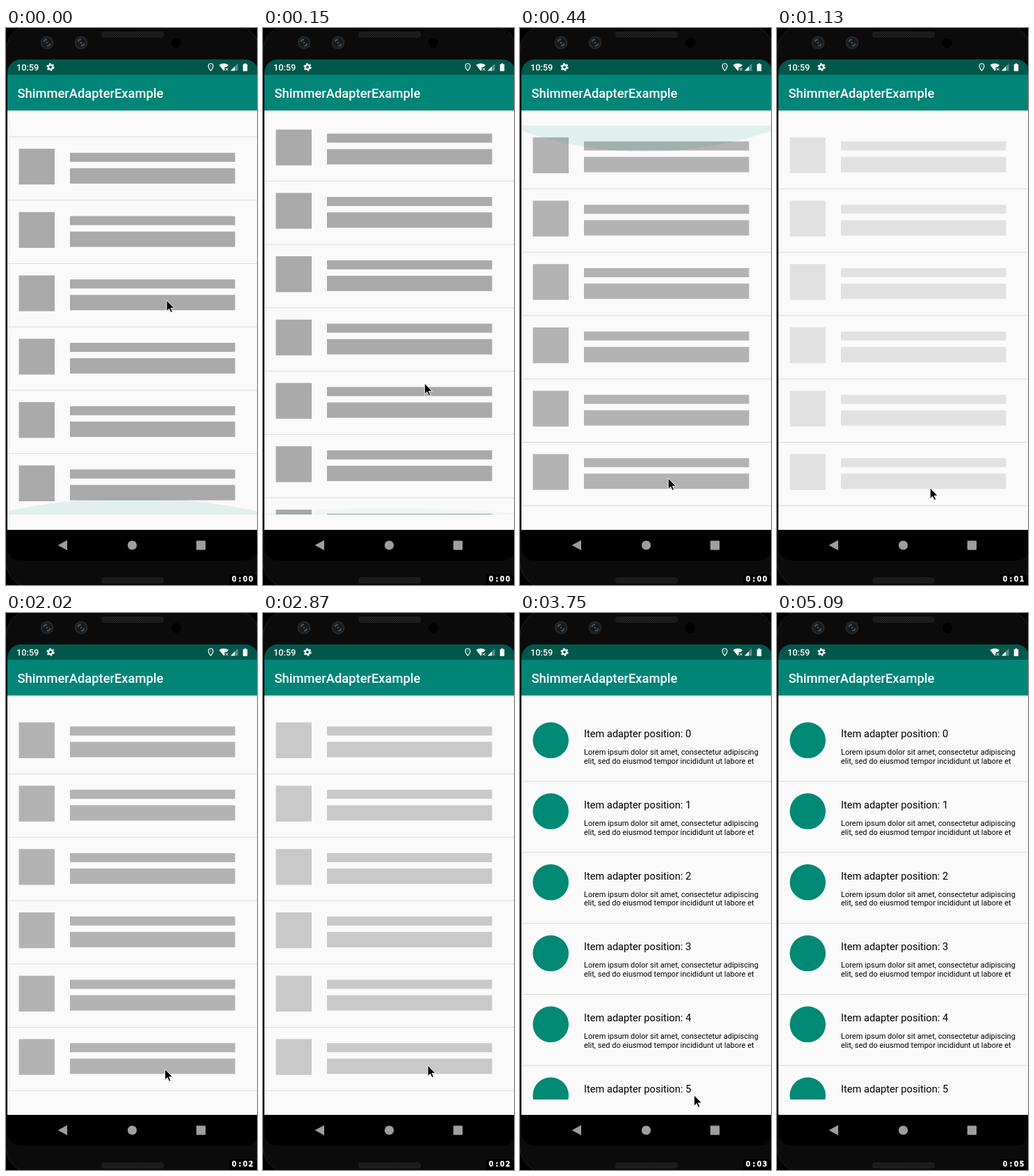
Recreate the animation shown at these times as an HTML page. Size 361 by 798 pixels, loop 5.19 s.

```html
<!DOCTYPE html>
<html lang="en">
<head>
<meta charset="utf-8">
<title>Shimmer list</title>
<style>
html, body { margin: 0; width: 361px; height: 798px; overflow: hidden; background: #000; }
svg { display: block; font-family: Roboto, sans-serif; }
.medium { font-weight: 500; fill: #fff; }
.title { font-size: 14.62px; }
.detail { font-size: 11.03px; }
.timer { font: bold 9.6px "DejaVu Sans", sans-serif; fill: #fff; stroke: #fff; stroke-width: .3; }
.line { fill: #dadada; }
</style>
</head>
<body>
<svg width="361" height="798" viewBox="0 0 361 798">
  <defs>
    <clipPath id="screen"><rect x="2" y="45" width="361" height="718" rx="19"/></clipPath>
    <clipPath id="list"><rect x="2" y="140" width="359" height="557"/></clipPath>
    <linearGradient id="shade" x2="0" y2="1">
      <stop stop-color="#000" stop-opacity=".2"/><stop offset="1" stop-color="#000" stop-opacity="0"/>
    </linearGradient>
    <pattern id="mesh" width="3" height="3" patternUnits="userSpaceOnUse">
      <rect width="3" height="3" fill="#262626"/><path d="M0 0L3 3M3 0L0 3" stroke="#111" stroke-width=".8"/>
    </pattern>
    <g id="lens">
      <circle r="9.5" fill="#222527"/><circle r="6.5" fill="#15181a"/>
      <path d="M-4.5 -1A4.5 4.5 0 0 1 0 -4.5M4.5 1A4.5 4.5 0 0 1 0 4.5" fill="none" stroke="#4c555b" stroke-width="1.8"/>
      <circle r="1.6" fill="#3c444a"/>
    </g>
  </defs>

  <rect x="-.5" y="-5" width="366" height="808" rx="40" fill="#0b0b0b" stroke="#222"/>
  <rect x="137" y="5" width="90" height="9" rx="4" fill="url(#mesh)"/>
  <rect x="137" y="787" width="90" height="9" rx="4" fill="url(#mesh)"/>
  <use href="#lens" x="59" y="21"/>
  <use href="#lens" x="108" y="21"/>
  <circle cx="245" cy="21.5" r="7" fill="#000"/>

  <g clip-path="url(#screen)">
    <rect y="45" width="361" height="718" fill="#000"/>
    <rect y="118" width="361" height="601" fill="#fafafa"/>
    <rect y="45" width="361" height="22" fill="#00574b"/>
    <rect y="67" width="361" height="51" fill="#008577"/>
    <rect y="118" width="361" height="3" fill="url(#shade)"/>
  </g>
  <text class="medium" x="15" y="61" font-size="12.75">10:59</text>
  <text class="medium" x="16.5" y="99.8" font-size="18.35">ShimmerAdapterExample</text>

  <g fill="none" stroke="#fff">
    <circle cx="64" cy="56" r="3.1" stroke-width="2.4"/>
    <circle cx="64" cy="56" r="4.7" stroke-width="2" stroke-dasharray="2.46"/>
    <path id="pin" d="M294.5 61C292.8 59 291.1 56.8 291.1 54.4A3.4 3.4 0 0 1 297.9 54.4C297.9 56.8 296.2 59 294.5 61ZM293.9 54.4H295.1" stroke-width="1.2"/>
  </g>
  <path d="M306.5 53Q313 48.5 320 53L317.5 56H314.5V60L313.3 61.5Z" fill="#fff"/>
  <path d="M315.7 57.2L319.5 61M319.5 57.2L315.7 61" stroke="#fff"/>
  <path d="M323 61.2L333.5 50.7V61.2Z" fill="#fff" opacity=".35"/>
  <path d="M323 61.2L329 55.2V61.2Z" fill="#fff"/>
  <path d="M340.8 52H342.6V50.8H345.4V52H347.2V61.7H340.8Z" fill="#fff"/>

  <g fill="#9e9e9e">
    <path d="M74.6 741L88 733.8V748.2Z"/>
    <circle cx="181.5" cy="741" r="6.6"/>
    <rect x="273.7" y="734.5" width="13.3" height="13.3" rx="1"/>
  </g>

  <g clip-path="url(#list)">
    <g id="skeleton"></g>
    <g id="items"></g>
    <path id="glow" fill="#008577"/>
  </g>

  <rect x="321" y="783" width="38" height="15" fill="#000"/>
  <text id="timer" class="timer" x="324.8 334.6 340.8 348.8" y="793"></text>
  <path id="cursor" d="M0 0V15.5L3.6 12.2L6 17.6L8.4 16.5L6 11.3H11Z" stroke="#fff" stroke-width=".9"/>
</svg>
<script>
const LOOP = 5190;
const STEP = 145;
const LEAD = 30;
const CLOCK_RATE = 7; // steps per second on the timer
const LOADED = 22;
const PIN_OFF = 31;
const PULSE = 7.5;    // steps from darkest to lightest gray

const $ = id => document.getElementById(id);
const set = (id, attrs) => Object.entries(attrs).forEach(([name, value]) => $(id).setAttribute(name, value));
const show = visible => ({ display: visible ? 'inline' : 'none' });
const clamp = v => Math.min(1, Math.max(0, v));
const mix = (a, b, k) => a + (b - a) * k;
const easeOut = k => 1 - (1 - clamp(k)) ** 2;
const smooth = k => clamp(k) ** 2 * (3 - 2 * clamp(k));
const rect = (x, y, w, h, cls = '') => `<rect class="${cls}" x="${x}" y="${y}" width="${w}" height="${h}"/>`;
const stack = (count, pitch, draw) => Array.from({ length: count },
  (_, i) => `<g transform="translate(0 ${i * pitch})">${draw(i)}</g>`).join('');

$('skeleton').innerHTML = stack(8, 90.75, () =>
  rect(18.5, 156.7, 51.5, 51.3) + rect(92, 162.5, 237.5, 13) + rect(92, 184.6, 237.5, 22) +
  rect(2, 230, 359, 1, 'line'));

$('items').innerHTML = stack(6, 101.75, i => `
  <circle cx="44.2" cy="182.3" r="25.8" fill="#008975"/>
  <text class="title" x="92" y="178.2">Item adapter position: ${i}</text>
  <text class="detail" x="92" y="203">Lorem ipsum dolor sit amet, consectetur adipiscing</text>
  <text class="detail" x="92" y="215.9">elit, sed do eiusmod tempor incididunt ut labore et</text>
  ${rect(2, 240.7, 359, 1, 'line')}`);

// Drags down, drifts slowly, then leaves through the bottom edge.
function cursorAt(step) {
  const leave = Math.max(0, step - 24);
  return [
    209 + 1.4 * step + 22 * (1 - smooth((step - 1) / 2)) + 2.5 * leave,
    mix(390, 666 - 0.9 * step, easeOut(step / 4.05)) + 17 * leave ** 1.5
  ];
}

// Overscroll glow: fades at the bottom, then swells and recedes at the top.
function drawGlow(step) {
  const atTop = step > 1;
  const strength = atTop ? clamp(Math.min((step - 1) / 2, (8 - step) / 5)) : 1 - 0.6 * step;
  const base = atTop ? 140 : 697;
  const depth = (atTop ? 37 : -24) * strength;
  const side = base + 0.2 * depth;
  const control = base + 1.8 * depth;
  set('glow', { d: `M2 ${base}V${side}Q181.5 ${control} 361 ${side}V${base}Z`, opacity: 0.1 * strength });
}

function render(time) {
  const step = Math.floor((time + LEAD) / STEP);
  const loaded = step >= LOADED;
  const gray = Math.round(198 - 28 * Math.cos(Math.PI * Math.max(0, step - 1) / PULSE));
  const scroll = 74.5 * clamp(1 - 0.85 * step);

  set('skeleton', { ...show(!loaded), fill: `rgb(${gray},${gray},${gray})`, transform: `translate(0 ${-scroll})` });
  set('items', show(loaded));
  set('pin', show(step < PIN_OFF));
  set('cursor', { transform: `translate(${cursorAt(step)})` });
  $('timer').textContent = `0:0${Math.floor(step / CLOCK_RATE)}`;
  drawGlow(step);
}

const start = performance.now();
function loop() {
  render((performance.now() - start) % LOOP);
  requestAnimationFrame(loop);
}
loop();
</script>
</body>
</html>
```
